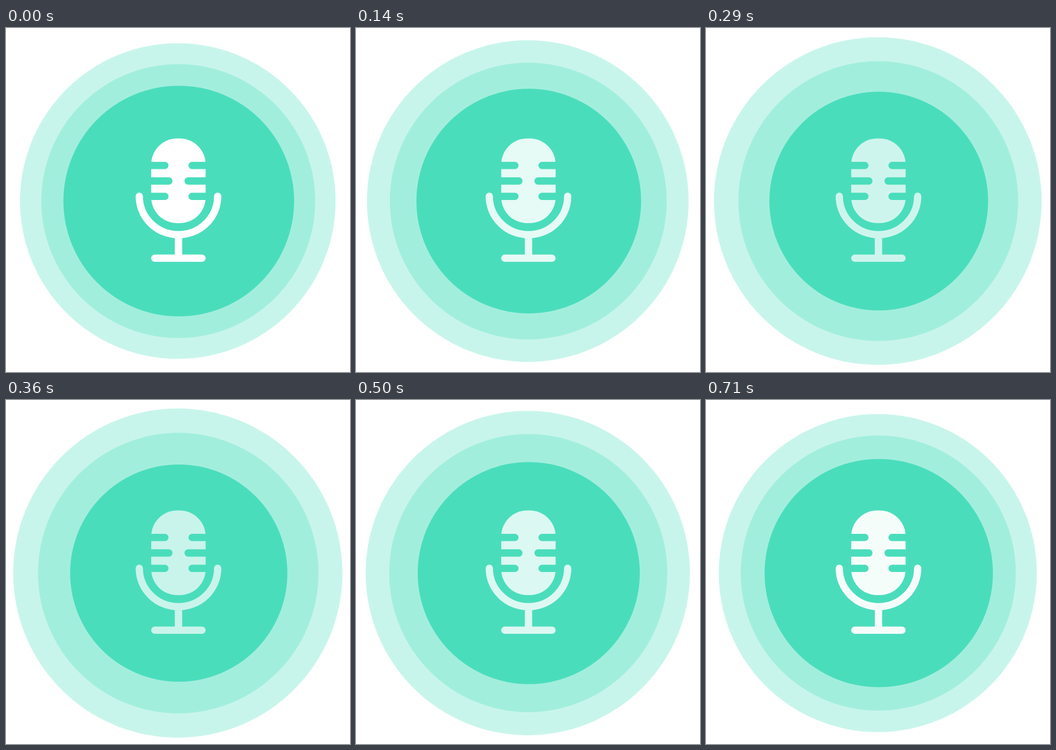
These frames come from a looping animation (640x640 px, 780 ms). An HTML page:

```html
<!DOCTYPE html>
<html lang="en">
<head>
<meta charset="utf-8">
<title>Microphone pulse</title>
<style>
  html, body { margin: 0; width: 100%; height: 100%; overflow: hidden; background: #fff; }
  svg { display: block; width: 100%; height: 100%; }

  /* --p: pulse amount, 0 at rest and 1 at the peak, held between steps */
  .pulse { --p: 0; fill: #4addbc; animation: pulse 780ms step-end infinite; }
  .halo { fill-opacity: .3; }
  .outer { r: calc((293.6 + 12.7 * var(--p)) * 1px); }
  .middle { r: calc((254.8 + 6.2 * var(--p)) * 1px); }
  .disc { r: calc((214.6 - 12.6 * var(--p)) * 1px); }

  .mic { opacity: calc(1 - .3 * var(--p)); }
  .body { fill: #fff; }
  .stand, .slots { fill: none; stroke-width: 13.6; stroke-linecap: round; }
  .stand { stroke: #fff; }
  .slots { stroke: #4addbc; }

  @keyframes pulse {
    0%     { --p: 0; }
    8.97%  { --p: .222; }
    17.94% { --p: .445; }
    26.92% { --p: .665; }
    37.17% { --p: .885; }
    46.15% { --p: .995; }
    55.12% { --p: .815; }
    64.1%  { --p: .635; }
    73.07% { --p: .455; }
    82.05% { --p: .36; }
    91.02% { --p: .178; }
    100%   { --p: 0; }
  }
</style>
</head>
<body>
<svg viewBox="0 0 640 640">
  <g class="pulse">
    <circle class="halo outer" cx="319.6" cy="322" r="293.6"/>
    <circle class="halo middle" cx="320.5" cy="322" r="254.8"/>
    <circle class="disc" cx="321.4" cy="322" r="214.6"/>
    <g class="mic">
      <rect class="body" x="270.2" y="205.6" width="101.2" height="157.4" rx="48"/>
      <path class="slots" d="M262 255.8H295.6M262 284.6H303M262 313.3H295.6
                             M380 255.8H346.2M380 284.6H338.8M380 313.3H346.2"/>
      <path class="stand" d="M248 313a72.9 71.6 0 0 0 145.8 0M320.9 385V428M276.9 428.2H364.6"/>
    </g>
  </g>
</svg>
</body>
</html>
```
